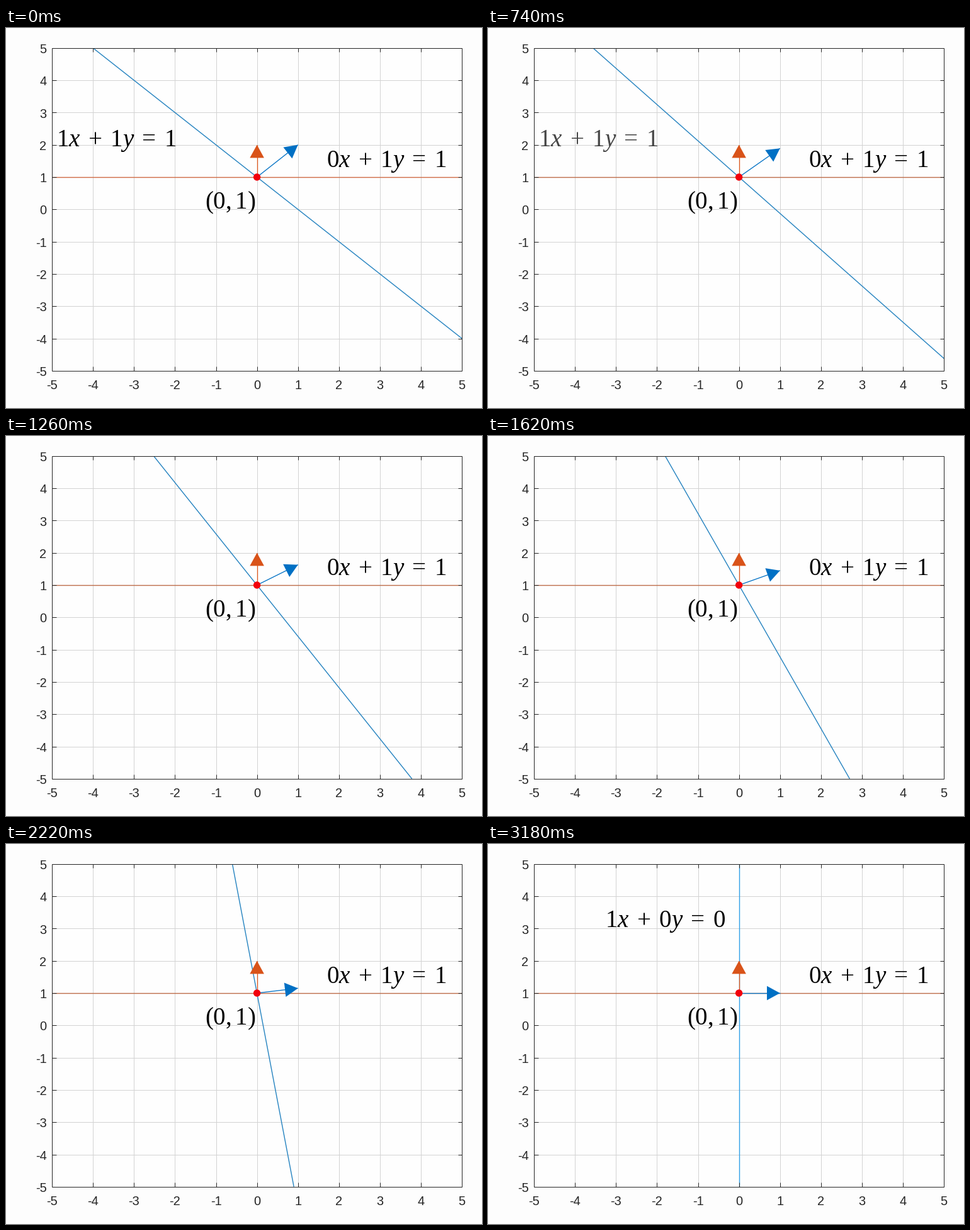
A matplotlib script for the animation above (3720 ms loop, 756 by 604 pixels).

```python
import numpy as np
import matplotlib.pyplot as plt
from matplotlib.animation import FuncAnimation
from matplotlib.patches import Circle, Polygon, Rectangle

plt.rcParams.update({
    "font.family": "Liberation Sans",
    "mathtext.fontset": "custom",
    "mathtext.rm": "Liberation Serif",
    "mathtext.it": "Liberation Serif:italic",
})

W, H, DPI = 756, 604, 100
LOOP, STEP = 3720, 20
HOLD, LAST, TICK = 540, 3180, 40      # start, end and spacing of updates, ms
PT = 72 / DPI                         # points per pixel

INK, GRID = "#262626", "#d3d3d3"
BLUE, ORANGE, RED = "#0070c4", "#d95319", "#f2000c"


def px(x):
    return 398.6 + 65.1 * x


def py(y):
    return 288.3 - 51.3 * y


fig = plt.figure(figsize=(W / DPI, H / DPI), dpi=DPI, facecolor="#fdfdfd")
ax = fig.add_axes([0, 0, 1, 1])
ax.set(xlim=(0, W), ylim=(H, 0))
ax.axis("off")


def line(xs, ys, color, width=1.0, z=2, **kw):
    return ax.plot(xs, ys, color=color, lw=width * PT, zorder=z,
                   solid_capstyle="butt", **kw)[0]


def formula(x, y, text):
    return ax.text(x, y, text, fontsize=39 * PT, color="black",
                   ha="center", va="baseline", zorder=8)


def equation(a, b, c):
    return rf"${a}x\;+\;{b}y\;=\;{c}$"


def head(tip, tail, length=20.7, half=11.3):
    """Corners of a solid arrowhead."""
    tip, tail = np.array(tip), np.array(tail)
    u = (tip - tail) / np.hypot(*(tip - tail))
    n = np.array([-u[1], u[0]])
    base = tip - length * u
    return [tip, base + half * n, base - half * n]


def arrow(tip, color):
    stem = line([ox, tip[0]], [oy, tip[1]], color, 1.3, z=5)
    tri = ax.add_patch(Polygon(head(tip, (ox, oy)), fc=color, ec="none", zorder=6))
    return stem, tri


# Plot frame, grid, ticks and tick labels
left, right, top, bottom = px(-5), px(5), py(5), py(-5)
box = dict(xy=(left, top), width=right - left, height=bottom - top)
ax.add_patch(Rectangle(**box, fc="#fefefe", ec="none", zorder=0))
ax.add_patch(Rectangle(**box, fc="none", ec=INK, lw=PT, zorder=4))
clip = Rectangle(**box, transform=ax.transData)

for v in range(-5, 6):
    x, y = px(v), py(v)
    if abs(v) < 5:
        line([x, x], [top, bottom], GRID, z=1)
        line([left, right], [y, y], GRID, z=1)
        for a, b in ((top, top + 6.5), (bottom, bottom - 6.5)):
            line([x, x], [a, b], INK, z=4)
        for a, b in ((left, left + 6.5), (right, right - 6.5)):
            line([a, b], [y, y], INK, z=4)
    style = dict(fontsize=20 * PT, color=INK, va="baseline")
    ax.text(64.5, y + 8.2, str(v), ha="right", **style)
    ax.text(x, 574.3, str(v), ha="center", **style)

# Fixed and moving parts around the crossing point
ox, oy = px(0), py(1)
flat = line([left, right], [oy, oy], ORANGE, 1.4, z=3)
slant = line([], [], BLUE, 1.4, z=3)
slant.set_clip_path(clip)
arrow((ox, py(2)), ORANGE)
stem, tri = arrow((px(1), py(2)), BLUE)
ax.add_patch(Circle((ox, oy), 5.7, fc=RED, ec="none", zorder=7))

formula(356, 287.3, r"$(0,1)$")
formula(604, 221.3, equation(0, 1, 1))
old = formula(175.5, 188.3, equation(1, 1, 1))
new = formula(282, 132.3, equation(1, 0, 0))

ENDS = np.array([-5, 5])


def ramp(t, start, end):
    return float(np.clip((t - start) / (end - start), 0, 1))


def draw(i):
    t = i * STEP
    if t >= HOLD:
        t = min(HOLD + (t - HOLD) // TICK * TICK, LAST)
    else:
        t = 0

    # Line x + b*y = b pivots on (0, 1) while b falls from 1 to 0
    b = 1 - ramp(t, 520, 2520)
    slant.set_data(px(b * (1 - ENDS)), py(ENDS))
    slant.set_color("#2f9fe8" if b == 0 else "#2583c0")
    flat.set_color("#cf6a44" if t == 0 else "#bd6c49")

    tip = (px(1), py(1 + b))
    stem.set_data([ox, tip[0]], [oy, tip[1]])
    tri.set_xy(head(tip, (ox, oy)))

    old.set_alpha(1 - ramp(t, 600, 1100))
    new.set_alpha(ramp(t, 2600, 3120))
    return slant, flat, stem, tri, old, new


anim = FuncAnimation(fig, draw, frames=LOOP // STEP, interval=STEP, repeat=True)
plt.show()
```
